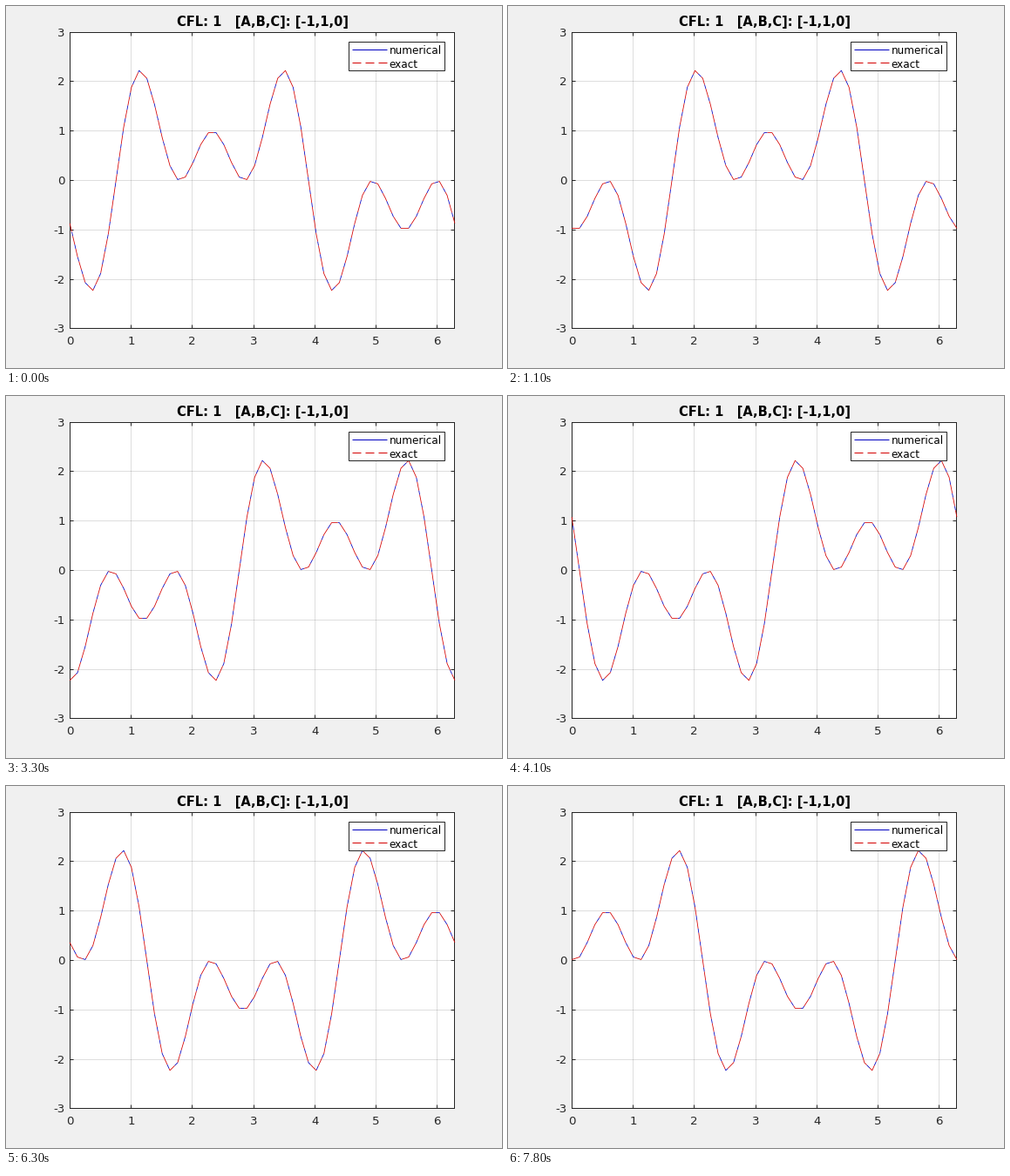
A matplotlib script for the animation above (8 s loop, 569 by 416 pixels).

```python
import numpy as np
import matplotlib.pyplot as plt
from matplotlib.animation import FuncAnimation
from matplotlib.patches import Rectangle

WIDTH, HEIGHT, DPI = 569, 416, 96
LEFT, RIGHT, TOP, BOTTOM = 73.2, 514.9, 30.1, 370.9
INK, BLUE, RED = "0.15", "#0000c0", "#d40000"
PIXEL = 72 / DPI
CURVE_WIDTH = 0.8
DASH, GAP = 10, 5
TICK = 4.4

FRAMES, INTERVAL = 80, 100
# Frames at which the wave moves on by one grid cell.
STEP_FRAMES = [2, 4, 5, 7, 8, 10, 11, 14, 16, 18, 20, 23, 25, 27, 30, 33, 34, 37,
               39, 41, 44, 47, 51, 53, 54, 57, 59, 60, 63, 64, 67, 68, 71, 73, 75, 78]
CELLS = 50
START_CELL = 6

plt.rcParams["font.family"] = "DejaVu Sans"
fig = plt.figure(figsize=(WIDTH / DPI, HEIGHT / DPI), dpi=DPI, facecolor="0.94")
ax = fig.add_axes([0, 0, 1, 1])
ax.set_xlim(0, WIDTH)
ax.set_ylim(HEIGHT, 0)
ax.axis("off")


def to_px(x):
    return LEFT + x / (2 * np.pi) * (RIGHT - LEFT)


def to_py(y):
    return TOP + (3 - y) / 6 * (BOTTOM - TOP)


def centre(v):
    """Middle of the pixel that holds v."""
    return np.floor(v) + 0.5


def line(xs, ys, color=INK, width=1, dash=None, **kw):
    style = "-" if dash is None else (dash[0] / width, (dash[1] / width, dash[2] / width))
    return ax.plot(xs, ys, color=color, lw=width * PIXEL, ls=style, snap=False,
                   solid_capstyle="butt", dash_capstyle="butt", **kw)[0]


def box(x0, y0, x1, y1, zorder, **kw):
    x0, y0, x1, y1 = centre([x0, y0, x1, y1])
    ax.add_patch(Rectangle((x0, y0), x1 - x0, y1 - y0, lw=PIXEL, snap=False,
                           zorder=zorder, **kw))


def label(x, baseline, text, size=10, ha="center", **kw):
    ax.text(x, baseline, text, size=size, ha=ha, va="baseline", **kw)


def draw_axes():
    box(LEFT, TOP, RIGHT, BOTTOM, 0, fc="white", ec="none")
    for x in range(7):
        px = centre(to_px(x))
        if x:
            line([px, px], [TOP, BOTTOM], alpha=0.15, zorder=1)
        for edge, inner in ((TOP, TOP + TICK), (BOTTOM, BOTTOM - TICK)):
            line([px, px], [edge, inner], zorder=2)
        label(px, 389, str(x), color=INK)
    for y in range(-3, 4):
        py = centre(to_py(y))
        if abs(y) < 3:
            line([LEFT, RIGHT], [py, py], alpha=0.15, zorder=1)
        for edge, inner in ((LEFT, LEFT + TICK), (RIGHT, RIGHT - TICK)):
            line([edge, inner], [py, py], zorder=2)
        label(68, py + 4.4, str(y), ha="right", color=INK)
    box(LEFT, TOP, RIGHT, BOTTOM, 2, fc="none", ec=INK)
    label(294.5, 23, "CFL: 1   [A,B,C]: [-1,1,0]", size=11, weight="bold", color="black")


def draw_legend():
    box(393, 41, 503, 74, 5, fc="white", ec=INK)
    line([397.5, 437.5], [50.5, 50.5], BLUE, zorder=6)
    line([397.5, 437.5], [65.5, 65.5], RED, dash=(0, DASH, GAP), zorder=6)
    label(439.5, 55, "numerical", size=9, ha="left", color="black", zorder=6)
    label(439.5, 71, "exact", size=9, ha="left", color="black", zorder=6)


def wave(x):
    return np.sin(x) + np.sin(3 * x) + np.sin(5 * x)


draw_axes()
draw_legend()
grid = np.linspace(0, 2 * np.pi, CELLS + 1)
px, py = to_px(grid), to_py(wave(grid))
# The curves coincide, so blue only shows in the gaps between the red dashes.
numerical = line(px, py, BLUE, CURVE_WIDTH, (GAP, GAP, DASH), zorder=3)
exact = line(px, py, RED, CURVE_WIDTH, (0, DASH, GAP), zorder=4)


def update(frame):
    steps = sum(frame >= start for start in STEP_FRAMES)
    shift = (START_CELL + steps) * 2 * np.pi / CELLS
    py = to_py(wave(grid - shift))
    numerical.set_ydata(py)
    exact.set_ydata(py)
    return numerical, exact


anim = FuncAnimation(fig, update, frames=FRAMES, interval=INTERVAL,
                     init_func=lambda: update(0), repeat=True, repeat_delay=0)
plt.show()
```
